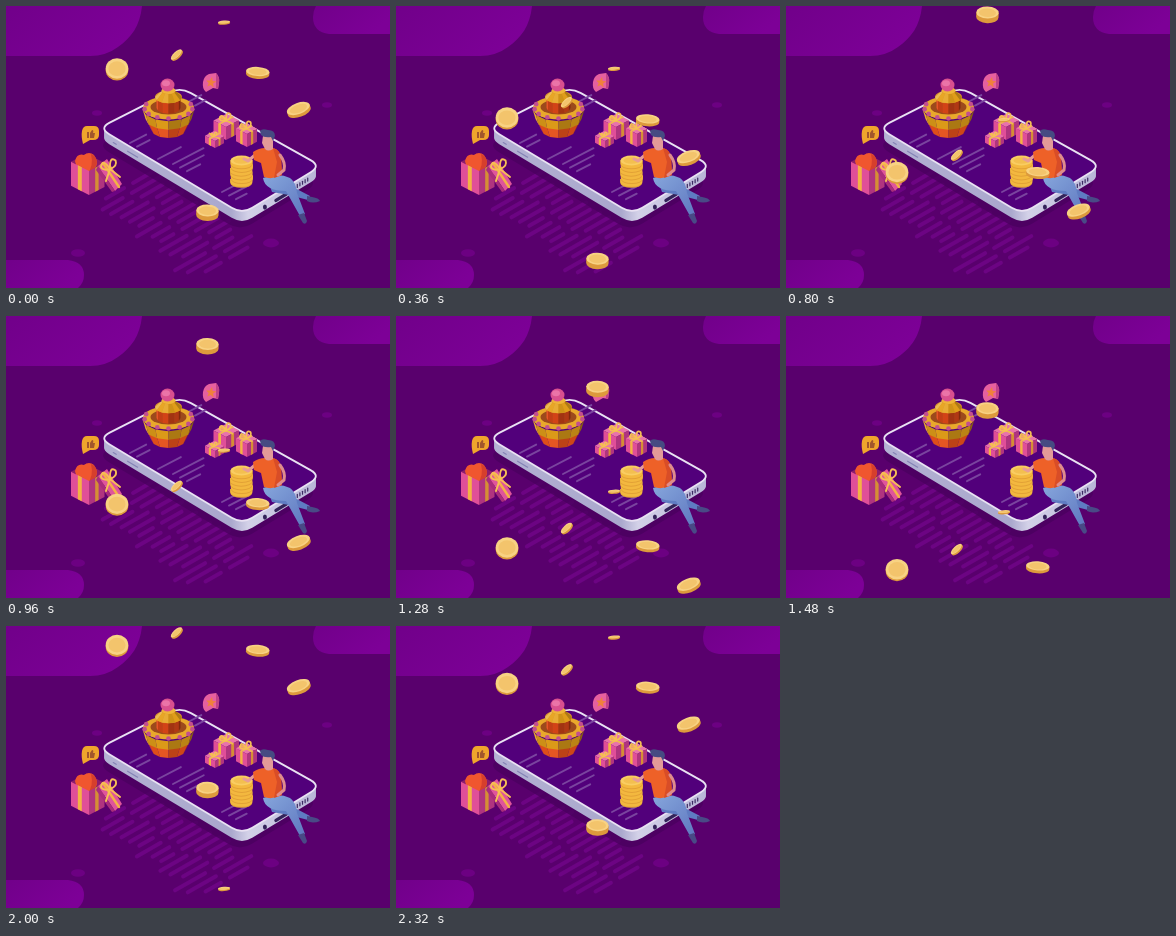
An HTML page that plays this animation: 384x282 px, repeating every 2.36 s.

```html
<!DOCTYPE html>
<html lang="en">
<head>
<meta charset="utf-8">
<title>Falling coins</title>
<style>
html, body { margin: 0; width: 100%; height: 100%; overflow: hidden; background: #59006d; }
svg { display: block; width: 100vw; height: 100vh; }
</style>
</head>
<body>
<svg id="stage" viewBox="0 0 384 282">
  <defs>
    <linearGradient id="glow" x1="0" x2="1" y1="0" y2=".4">
      <stop offset="0" stop-color="#71008a"/><stop offset="1" stop-color="#7d0097"/>
    </linearGradient>
    <linearGradient id="side" x1="0" x2="1">
      <stop offset="0" stop-color="#b3b1d3"/><stop offset=".6" stop-color="#aaa8cd"/>
      <stop offset=".68" stop-color="#d3d1e8"/><stop offset="1" stop-color="#b9b6d8"/>
    </linearGradient>
    <linearGradient id="jeans" x1="0" x2="1" y2="1">
      <stop offset="0" stop-color="#86a6dc"/><stop offset="1" stop-color="#5f78c0"/>
    </linearGradient>
  </defs>
</svg>
<script>
const stage = document.getElementById('stage');
const NS = 'http://www.w3.org/2000/svg';
let layer = stage;

function add(tag, attrs) {
  const el = document.createElementNS(NS, tag);
  for (const k in attrs) el.setAttribute(k, attrs[k]);
  return layer.appendChild(el);
}
const path = (d, fill, more) => add('path', { d, fill, ...more });
const line = (d, stroke, width) => path(d, 'none',
  { stroke, 'stroke-width': width, 'stroke-linecap': 'round', 'stroke-linejoin': 'round' });
const oval = (cx, cy, rx, ry, fill) => add('ellipse', { cx, cy, rx, ry, fill });
const poly = (pts, fill) => path('M' + pts.join('L') + 'Z', fill);
const mix = (a, b, k) => [a[0] + (b[0] - a[0]) * k, a[1] + (b[1] - a[1]) * k];
const shift = (pts, dx, dy) => pts.map(([x, y]) => [x + dx, y + dy]);

let seed = 11;
const rand = () => (seed = seed * 16807 % 2147483647) / 2147483647;

// Polygon outline with corners rounded by distance r
function rounded(pts, r) {
  const toward = (a, b) => mix(a, b, r / Math.hypot(b[0] - a[0], b[1] - a[1]));
  return pts.map((p, i) => {
    const prev = pts.at(i - 1), next = pts[(i + 1) % pts.length];
    return (i ? 'L' : 'M') + toward(p, prev) + 'Q' + p + ' ' + toward(p, next);
  }).join('') + 'Z';
}

const left = [93, 122], top_ = [174, 81], right = [315, 160], bottom = [236, 208];
const body = [left, top_, right, bottom];

function drawBack() {
  path('M0 0H136C134 20 125 32 112 41Q100 50 84 50H0Z', 'url(#glow)');
  path('M310 0H384V28H323Q307 26 307 11Q307 5 310 0Z', 'url(#glow)');
  path('M0 254H62Q78 256 78 269Q78 277 72 282H0Z', 'url(#glow)');
  const spot = (x, y, r) => oval(x, y, r, r * .55, '#6c0082');
  spot(91, 107, 5);
  spot(321, 99, 5);
  spot(72, 247, 7);
  spot(265, 237, 8);
  // broken streaks running away from the phone
  for (let i = 0; i < 15; i++) {
    let x = 148 + i * 7.5 - rand() * 12, y = 165 + i * 5 + (148 + i * 7.5 - x) * .57;
    for (let part = 0; part < 2; part++) {
      const w = 12 + rand() * 20;
      line(`M${x} ${y}l${-w} ${w * .57}`, '#6c0483', 4);
      x -= w + 9;
      y += (w + 9) * .57;
    }
  }
  path(rounded(shift(body, -2, 17), 14), '#4a0060', { opacity: .8 });
}

function stripes(x, y, count, length) {
  for (let i = 0; i < count; i++) {
    const w = length * (.7 + .3 * Math.sin(i * 2 + 1));
    line(`M${x + i * 7} ${y + i * 3.6}l${w} ${-w * .52}`, '#7a449f', 1.9);
  }
}

function drawPhone() {
  for (let dy = 10; dy > 0; dy--) path(rounded(shift(body, 0, dy), 12), 'url(#side)');
  path(rounded(body, 12), '#52007b', { stroke: '#e9e2f3', 'stroke-width': 1.8 });
  stripes(124, 137, 2, 17);
  stripes(152, 153, 1, 24);
  stripes(167, 158, 3, 32);
  stripes(216, 186, 3, 26);
  stripes(182, 96, 2, 14);

  const port = k => { const [x, y] = mix(bottom, right, k); return [x, y + 7]; };
  oval(...port(.29), 2, 2.6, '#33235a');
  line(`M${port(.43)}L${port(.56)}`, '#33235a', 3.4);
  for (let k = .7; k < .84; k += .033) line(`M${port(k)}v-3`, '#3a2a62', 1.2);
  const button = (a, b) => {
    const [p, q] = [a, b].map(k => mix(left, bottom, k));
    line(`M${p[0]} ${p[1] + 6}L${q[0]} ${q[1] + 6}`, '#8583b5', 1.2);
  };
  button(.1, .12);
  button(.2, .27);
}

// Front facets of a ten-sided cone slice, lit from the left
function facets(y0, r0, y1, r1, hue, light) {
  const n = 6, cx = 162.5;
  const at = (y, r, i) => [cx - r * Math.cos(Math.PI * i / n), y + r * .47 * Math.sin(Math.PI * i / n)];
  for (let i = 0; i < n; i++) {
    const l = light + 7 - i * 3.6 + (i % 2 ? -4 : 3);
    poly([at(y0, r0, i), at(y0, r0, i + 1), at(y1, r1, i + 1), at(y1, r1, i)], `hsl(${hue} 80% ${l}%)`);
  }
}

function drawTower() {
  facets(112, 23, 124, 17, 16, 49);
  facets(103, 26, 113, 23, 40, 45);
  oval(162.5, 102, 25.5, 11.5, '#e9a92b');
  oval(162.5, 101, 18, 7.5, '#9c4a1c');
  facets(91, 12, 102, 12, 14, 43);
  oval(162.5, 91, 13.5, 6.3, '#d9922a');
  facets(85, 7, 91, 13.5, 40, 53);
  oval(162.5, 84.5, 7, 3.5, '#efb338');
  for (let i = 0; i < 9; i++) {
    const a = Math.PI * (i / 8 * 1.24 - .12);
    oval(162.5 - 24 * Math.cos(a), 102 + 10.5 * Math.sin(a), 2.3, 2.3, '#c44f8d');
  }
  oval(161.5, 79, 7, 6.4, '#d9508f');
  oval(160, 77.3, 4, 3, '#ea74a8');
}

// Box seen from above; x, y is the front corner of its lid
function box(x, y, a, b, h, lid) {
  const s = .52;
  const at = (u, v, down = 0) => [x - a * u + b * v, y - (a * u + b * v) * s + down];
  const face = (u0, u1, v0, v1, fill) =>
    poly([at(u0, v0), at(u1, v1), at(u1, v1, h), at(u0, v0, h)], fill);
  poly([at(0, 0), at(1, 0), at(1, 1), at(0, 1)], lid);
  return {
    at,
    sides() {
      face(0, 1, 0, 0, '#e04f98');
      face(0, 0, 0, 1, '#b0347f');
      face(.4, .62, 0, 0, '#f3b344');
      face(0, 0, .4, .62, '#d58f35');
    }
  };
}

function bow(x, y, r) {
  line(`M${x} ${y}q${-r} ${-r * 1.6} ${-r * 1.3} ${-r * .3}q${r * .3} ${r * .6} ${r * 1.3} ${r * .3}` +
    `q${-r * .1} ${-r * 1.9} ${r * .8} ${-r * 1.2}q${r * .3} ${r * .8} ${-r * .8} ${r * 1.2}`, '#f6bf55', 1.2 + r * .1);
}

function gift(x, y, a, b, h) {
  const g = box(x, y, a, b, h, '#e873aa');
  g.sides();
  line(`M${g.at(.5, 0)}L${g.at(.5, 1)}M${g.at(0, .5)}L${g.at(1, .5)}`, '#f1b553', 1.8);
  bow(...g.at(.5, .5), h * .4);
}

function drawGifts() {
  gift(220, 121, 12.5, 13, 13);
  gift(241, 128, 11, 10, 13);
  gift(209, 135, 10, 9, 7);

  const open = box(83, 165, 18, 15.5, 24, '#8b1d6b');
  path('M81 169Q70 164 69 155Q71 147 78 149Q83 145 88 149Q94 158 88 163Z', '#f0562f');
  path('M81 169Q88 160 85 148Q91 150 91 157Q89 164 81 169Z', '#d63f2c');
  open.sides();
  poly([[92, 160], [101, 153], [116, 178], [109, 185]], '#df559b');
  poly([[92, 160], [109, 185], [106, 186], [90, 164]], '#a92c7b');
  line('M97 157L113 181', '#f3b344', 2.4);
  bow(104, 163, 7);
  line('M104 163l-4 12M104 163l10 8', '#f6bf55', 2);
}

function drawBubbles() {
  path('M81 120H88Q93 120 93 125V129Q93 134 87 134H84L77 138Q75 130 76 125Q77 120 81 120Z', '#f0a62c');
  path('M81 126h2v6h-2zM84 127l2-3q2 0 1 3h2l-1 5h-4z', '#a3572c');
  path('M203 68L210 67Q214 71 213 77L212 83L207 82L200 86Q196 83 197 76Q198 70 203 68Z', '#e6609f');
  path('M210 67Q214 71 213 77L212 83L210 82Z', '#bf4189');
  path('M206 71l.7 4l3.8.4l-3.4 2.2l.6 4l-3-2.6l-3.4 1.6l1.4-3.6l-2.6-2.6l3.8 0z', '#f0803c');
}

function drawPile() {
  for (let i = 5; i >= 0; i--) {
    const y = 154.5 + i * 3.7, x = 224.5 + Math.sin(i * 2) * .4;
    path(`M${x} ${y}v4a11 4.8 0 0 0 22 0v-4z`, '#e2a136');
    path(`M${x} ${y}v3a11 4.8 0 0 0 22 0v-3z`, '#f3b83f');
  }
  oval(235.5, 154.5, 11, 5, '#f9cd62');
  oval(235.5, 154.5, 8, 3.3, '#f3bf50');
}

function drawMan() {
  path('M262 175Q276 172 285 180L304 190L302 194L283 189L266 186Z', '#5f7cc2');
  path('M257 172Q272 166 284 172Q290 176 291 187L299 208L294 210L280 185Q259 185 257 172Z', 'url(#jeans)');
  path('M301 190L306 191Q313 192 314 195Q307 198 301 195Z', '#494a86');
  path('M292 209L298 207L301 215Q300 219 297 217Z', '#494a86');
  line('M249 149L242 155L238 153', '#e79c97', 3);
  path('M247 146Q253 142 259 142H267Q274 144 275 151L276 169Q266 174 258 171L255 157L248 154Z', '#ee6128');
  path('M267 142Q274 144 275 151L276 169L268 172L271 156Z', '#d94d27');
  line('M274 149Q280 157 278 164L272 169', '#de8c8c', 3);
  path('M257 130H267L267 143Q262 146 259 143L256 137Z', '#e39a98');
  path('M254 125Q256 122 262 124Q269 124 269 130L267 135L265 131Q258 132 255 129Z', '#464a82');
}

const coins = [];

function coin(x, y, rx, ry, tilt, rim) {
  const el = layer = add('g', {});
  const a = tilt * Math.PI / 180;
  const height = 2 * Math.hypot(rx * Math.sin(a), ry * Math.cos(a)) + rim;
  layer = add('g', { transform: `rotate(${tilt})` });
  path(`M${-rx} 0v${rim}a${rx} ${ry} 0 0 0 ${2 * rx} 0v${-rim}z`, '#dd9a3c');
  oval(0, 0, rx, ry, '#f8d283');
  oval(0, .2, rx * .76, ry * .72, '#f3c46c');
  layer = stage;
  coins.push({ el, x, y, height });
}

const LOOP = 2360, TICK = 40, STEPS = 56, FLOOR = 282;

function draw(ms) {
  const tick = Math.floor((ms % LOOP) / TICK);
  // one held picture in every twenty
  const p = (tick - Math.floor((tick + 7) / 20)) / STEPS;
  for (const c of coins) {
    const span = FLOOR + 1 + c.height;
    let y = c.y + p * span;
    if (y > FLOOR + c.height / 2) y -= span;
    c.el.setAttribute('transform', `translate(${c.x} ${y.toFixed(2)})`);
  }
}

drawBack();
drawPhone();
drawTower();
drawGifts();
drawBubbles();
drawPile();
drawMan();
coin(111, 62.5, 11.3, 10.2, 0, 1.8);
coin(170.3, 48.5, 7, 2.7, -43, 1.8);
coin(251.8, 65.5, 11.7, 4.6, 4, 2.8);
coin(292.3, 102.5, 12, 5.6, -20, 3);
coin(201.5, 204.5, 11.2, 6, 2, 4.6);
coin(218, 16, 6, 1.4, -4, 1.4);

const start = performance.now();
function run() {
  draw(performance.now() - start);
  requestAnimationFrame(run);
}
run();
</script>
</body>
</html>
```
